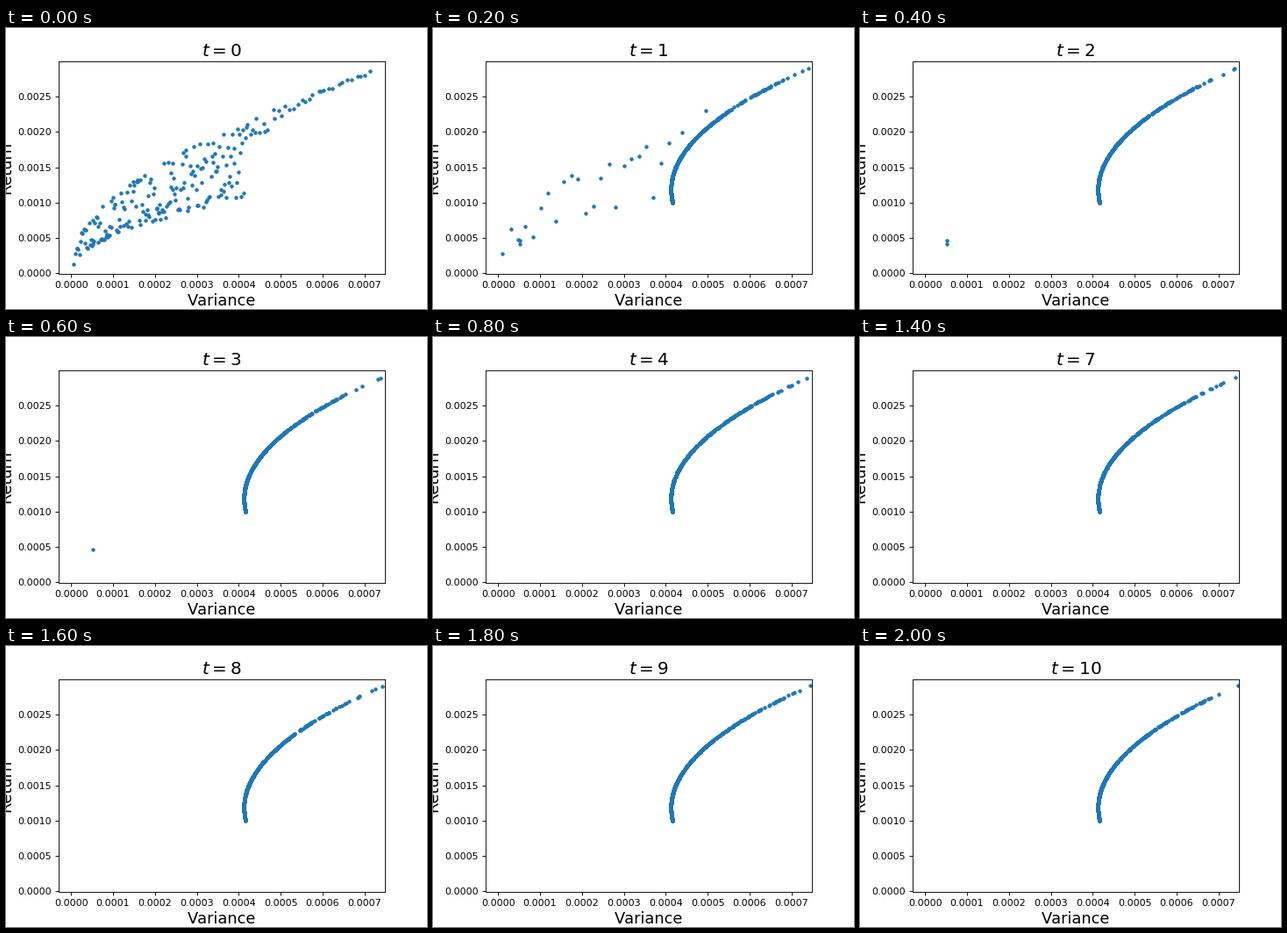
Write a matplotlib script that moves like this. It is 480x320 px and loops after 2200 ms.

```python
import numpy as np
import matplotlib.pyplot as plt
from matplotlib.animation import FuncAnimation
from matplotlib.ticker import FormatStrFormatter

W, H, DPI = 480, 320, 80
STEPS, INTERVAL = 11, 200
XLIM = (-2.964e-5, 7.4836e-4)
YLIM = (-1e-5, 2.995e-3)
LEFT, RIGHT, BOTTOM, TOP = 60, 432, 280, 38.4   # plot box in stage pixels

# The front is a parabola lying on its side, from its foot up to a moving top
VERTEX_X, VERTEX_Y, BEND, FOOT = 271.3, 184, 0.00824, 199.2
FRONT_SIZE = 450

STRAGGLERS = [(99, 242), (99, 246)]             # last dominated portfolios
EXTREMES = [(77, 269), (415, 49)]               # both ends of the first generation


def to_data(points):
    x, y = np.asarray(points, float).T
    u = (x - LEFT) / (RIGHT - LEFT)
    v = (BOTTOM - y) / (BOTTOM - TOP)
    return XLIM[0] + u * (XLIM[1] - XLIM[0]), YLIM[0] + v * (YLIM[1] - YLIM[0])


def first_generation():
    """A fan of square-root curves with a tail narrowing to the upper right."""
    rng = np.random.default_rng(12)
    n = 180
    x = 79 + 194 * (np.arange(n) + rng.random(n)) / n
    u, mix = rng.random(n), (x - 79) / 194
    spread = (1 - mix) * np.cos(np.pi * u) + mix * (1 - 2 * u)
    fan = np.column_stack([x, 279 - (9.1 + 3.1 * spread) * np.sqrt(x - 72)])

    n = 34
    x = 273 + 140 * ((np.arange(n) + rng.random(n)) / n) ** 1.3
    width = np.maximum(3, 30 - (x - 273) / 3)
    tail = np.column_stack([x, 105 - 0.394 * (x - 273) + width * rng.random(n)])

    points = np.vstack([fan, tail, EXTREMES])
    return points[np.argsort(points[:, 0])]


def front(step):
    """Random points on the parabola, thinning out towards the top."""
    rng = np.random.default_rng(step)
    top = np.interp(step, [1, 4, 10], [46, 47, 44.8])
    u = 1 - (1 - rng.random(FRONT_SIZE)) ** 0.55
    u[:2] = 0, 1
    y = FOOT + (top - FOOT) * u
    return np.column_stack([VERTEX_X + BEND * (VERTEX_Y - y) ** 2, y])


def population(step):
    start = first_generation()
    if step == 0:
        return np.vstack([start, STRAGGLERS])
    if step == 1:
        return np.vstack([front(step), start[1:200:8], STRAGGLERS])
    left = STRAGGLERS[:max(0, 4 - step)]
    return np.vstack([front(step), *left])


plt.rcParams.update({"font.family": "DejaVu Sans", "text.kerning_factor": 6})
fig = plt.figure(figsize=(W / DPI, H / DPI), dpi=DPI, facecolor="white")
ax = fig.add_axes([LEFT / W, 1 - BOTTOM / H, (RIGHT - LEFT) / W, (BOTTOM - TOP) / H])
ax.set_xticks(np.arange(8) * 1e-4)
ax.set_yticks(np.arange(6) * 5e-4)
ax.set(xlim=XLIM, ylim=YLIM)
for axis in (ax.xaxis, ax.yaxis):
    axis.set_major_formatter(FormatStrFormatter("%.4f"))
ax.set_xlabel("Variance", fontsize=16)
ax.set_ylabel("Return", fontsize=16)
title = ax.set_title("$t = 0$", fontsize=18)
dots, = ax.plot([], [], ".", color="#1f77b4", markersize=6)


def draw(step):
    dots.set_data(*to_data(population(step)))
    title.set_text(f"$t = {step}$")
    return dots, title


anim = FuncAnimation(fig, draw, frames=STEPS, init_func=lambda: draw(0),
                     interval=INTERVAL, repeat=True, repeat_delay=0)
plt.show()
```
